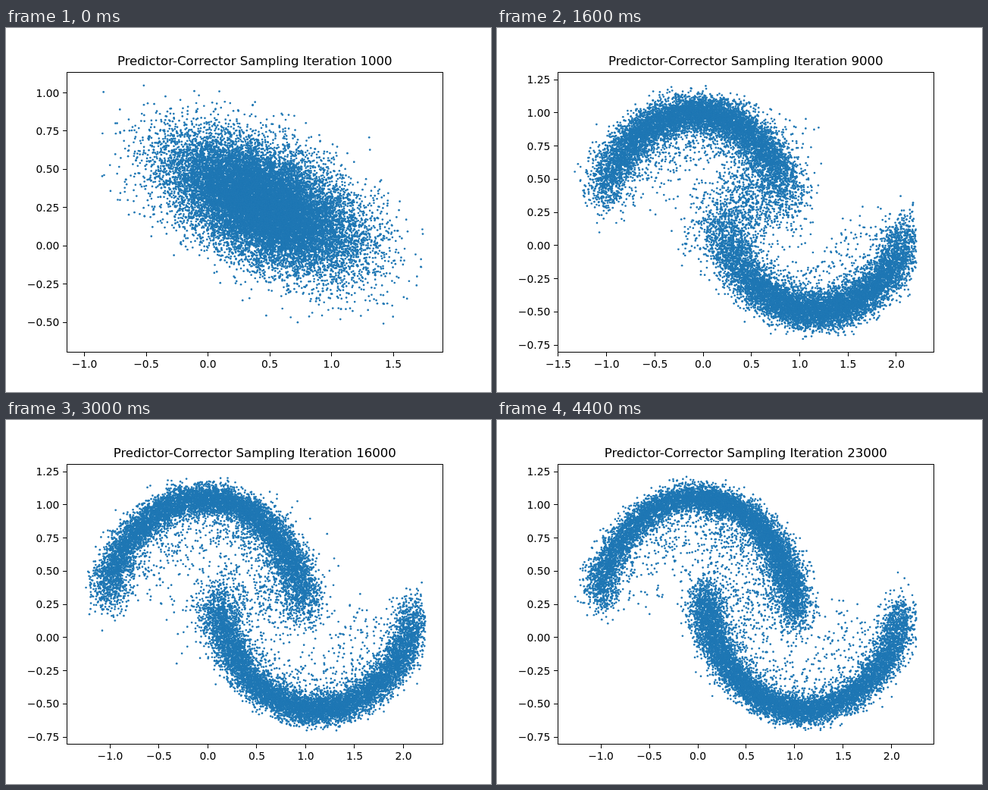
Recreate the animation shown at these times as an HTML page with a canvas. Size 640x480 px, loop 4600 ms.

```html
<!DOCTYPE html>
<html lang="en">
<head>
<meta charset="utf-8">
<title>Sampling</title>
<style>
  html, body { margin: 0; width: 100%; height: 100%; overflow: hidden; background: #fff; }
  canvas { display: block; }
</style>
</head>
<body>
<canvas id="stage" width="640" height="480"></canvas>
<script>
const ctx = document.getElementById('stage').getContext('2d');
const STEP_MS = 200, STEPS = 23, COUNT = 18000, DOT_RADIUS = 1.35;
const BOX = { left: 80, right: 576, top: 58, bottom: 427 };
const MARGIN = .05;

let seed = 20241;
function random() {
  seed = (seed + 0x6D2B79F5) | 0;
  let t = Math.imul(seed ^ (seed >>> 15), 1 | seed);
  t = (t + Math.imul(t ^ (t >>> 7), 61 | t)) ^ t;
  return ((t ^ (t >>> 14)) >>> 0) / 4294967296;
}
const normal = () =>
  Math.sqrt(-2 * Math.log(1 - random())) * Math.cos(2 * Math.PI * random());
const mix = (a, b, t) => a + (b - a) * t;
const clamp01 = v => Math.min(1, Math.max(0, v));
const decay = (n, span) => Math.exp(-n / span);
const bell = (n, center, width) => Math.exp(-(((n - center) / width) ** 2));
const fall = (n, center, rate) => 1 / (1 + Math.exp(rate * (n - center)));

const points = Array.from({ length: COUNT }, () => {
  const a = normal(), b = normal();
  return {
    start: [.45 + .38 * a, .27 + .21 * (.86 * b - .52 * a)],
    upper: a + .5 * normal() < 0,
    place: random(),
    rank: random(),
    along: random() * 2 - 1,
    pull: .45 * random() ** 22,
    noise: [normal(), normal(), normal(), normal()],
  };
});

// Extent of the data at iteration n (in thousands)
const extent = n => ({
  left: -1.27 + .4 * bell(n, 3, 3.1) - .07 * bell(n, 9, 2.5),
  right: 2.28 + .05 * Math.cos(Math.PI * (n - 19) / 3) - .57 * decay(n - 1, 3.2),
  bottom: -.705 + .095 * fall(n, 5, 2),
  top: 1.212 - .17 * fall(n, 3.2, 1.2),
});

// Shape of both moons and of the points between them
function poseAt(n) {
  const growth = 1 - decay(n - 1, 3.5);
  return {
    split: Math.sqrt(clamp01((n - 1) / 2)),
    apexX: -.22 * decay(n, 9),
    apexY: 1.055 - .5 * decay(n - 1, 3.6),
    noise: .05 + .07 * decay(n, 7),
    innerShare: .41 + .17 * n / STEPS,
    inner: { reach: 1.5 * growth, even: clamp01((n - 5) / 14) },
    outer: { reach: -1.36 * growth, even: clamp01(1 - decay(n - 3, 5)) },
    bridgeShare: .03 + .05 * bell(n, 7, 6),
    bridgeTilt: .8 * Math.sin(Math.PI * (n - 5) / 13),
    bridgeSpread: .22 - .2 * decay(n, 4),
    turn: 2 * Math.log(n),
  };
}

// Angle from the apex; density tapers towards the tip unless the arm is even
function armAngle(place, { innerShare, inner, outer }) {
  const isInner = place < innerShare;
  const arm = isInner ? inner : outer;
  const t = isInner ? 1 - place / innerShare : (place - innerShare) / (1 - innerShare);
  return arm.reach * mix(1 - Math.sqrt(1 - t), t, arm.even);
}

function settled(p, pose) {
  const c = Math.cos(pose.turn), s = Math.sin(pose.turn);
  const nx = p.noise[0] * c + p.noise[1] * s;
  const ny = p.noise[2] * c + p.noise[3] * s;
  if (p.rank < pose.bridgeShare) {
    return [
      .45 + .42 * p.along * Math.cos(pose.bridgeTilt) + pose.bridgeSpread * nx,
      .32 + .42 * p.along * Math.sin(pose.bridgeTilt) + pose.bridgeSpread * ny,
    ];
  }
  const angle = armAngle(p.place, pose);
  const width = pose.noise * (1 + .4 * angle * angle);
  let x = pose.apexX + 1.04 * Math.sin(angle) + width * nx;
  let y = pose.apexY - .95 * (1 - Math.cos(angle)) + width * ny;
  if (!p.upper) { x = 1.08 - x; y = .5 - y; }
  return [mix(x, .5, p.pull), mix(y, .25, p.pull)];
}

function drawPoints(pose, range, toX, toY) {
  ctx.fillStyle = '#1f77b4';
  for (const p of points) {
    const end = settled(p, pose);
    const x = mix(p.start[0], end[0], pose.split);
    const y = mix(p.start[1], end[1], pose.split);
    if (x < range.left || x > range.right || y < range.bottom || y > range.top) continue;
    ctx.beginPath();
    ctx.arc(toX(x), toY(y), DOT_RADIUS, 0, 2 * Math.PI);
    ctx.fill();
  }
}

// Maps low..high to from..to, leaving a margin at both ends
function scale(low, high, from, to) {
  const pad = (high - low) * MARGIN;
  return v => mix(from, to, (v - low + pad) / (high - low + 2 * pad));
}

const label = (value, digits) => (value < 0 ? '\u2212' : '') + Math.abs(value).toFixed(digits);

function drawAxes(toX, toY) {
  ctx.fillStyle = '#000';
  ctx.font = '13.89px "DejaVu Sans", sans-serif';
  ctx.textAlign = 'center';
  for (let v = -2; v <= 3; v += .5) {
    const x = toX(v);
    if (x < BOX.left || x > BOX.right) continue;
    ctx.fillRect(Math.floor(x), BOX.bottom, 1, 6);
    ctx.fillText(label(v, 1), x, 448);
  }
  ctx.textAlign = 'right';
  for (let v = -1; v <= 1.5; v += .25) {
    const y = toY(v);
    if (y < BOX.top || y > BOX.bottom) continue;
    ctx.fillRect(BOX.left - 5, Math.floor(y), 6, 1);
    ctx.fillText(label(v, 2), 70.3, Math.round(y + 5));
  }
  ctx.strokeStyle = '#000';
  ctx.lineWidth = 1;
  ctx.strokeRect(BOX.left + .5, BOX.top + .5, BOX.right - BOX.left, BOX.bottom - BOX.top);
}

function draw(n) {
  const range = extent(n);
  const toX = scale(range.left, range.right, BOX.left, BOX.right);
  const toY = scale(range.bottom, range.top, BOX.bottom, BOX.top);
  ctx.fillStyle = '#fff';
  ctx.fillRect(0, 0, 640, 480);
  drawPoints(poseAt(n), range, toX, toY);
  drawAxes(toX, toY);
  ctx.font = '16.6px "DejaVu Sans", sans-serif';
  ctx.textAlign = 'center';
  ctx.fillText(`Predictor-Corrector Sampling Iteration ${n * 1000}`, 328.3, 49);
}

let shown = -1;
function tick() {
  const step = Math.floor(performance.now() / STEP_MS) % STEPS;
  if (step !== shown) draw((shown = step) + 1);
  requestAnimationFrame(tick);
}
tick();
</script>
</body>
</html>
```
